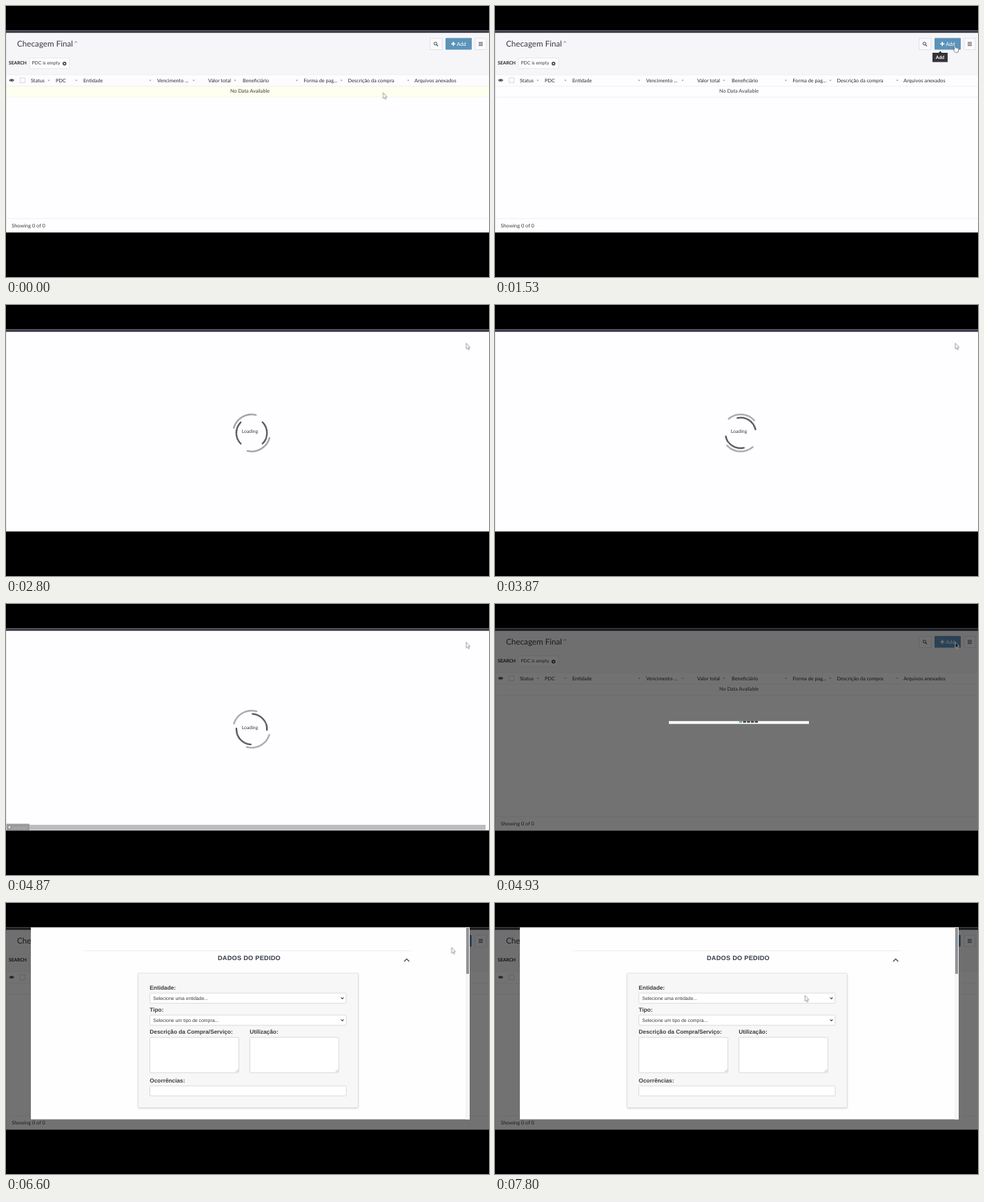
Animation of 700x394 px, one loop 8 s. Source, as an HTML page:

```html
<!DOCTYPE html>
<html lang="pt-BR">
<head>
<meta charset="utf-8">
<title>Checagem Final</title>
<style>
html, body { margin: 0; height: 100%; overflow: hidden; background: #000; }
svg { display: block; width: 100vw; height: 100vh; }
text { font-family: Lato, sans-serif; fill: #3c3c40; text-rendering: geometricPrecision; white-space: pre; }
.form text { font-family: "Liberation Sans", Arial, sans-serif; }
.label { font-size: 8.3px; font-weight: 700; }
.option { font-size: 6.9px; }
.line { fill: none; stroke: #45454a; }
.field { fill: #fff; stroke: #d2d2d5; stroke-width: .8; }

/* Hard switches: one 8 s clock for every part */
.list, .loading, .overlay, .hover, .tooltip, .hand, .arrow, .scroll, .dots, .form, .modal {
  animation: 8s step-end infinite;
}
.list { animation-name: list; }
.loading { animation-name: loading; }
.overlay { animation-name: overlay; }
.hover { animation-name: hover; }
.tooltip { animation-name: tooltip; }
.hand { animation-name: hand; }
.arrow { animation-name: arrow; }
.scroll { animation-name: scroll; }
.dots { animation-name: dots; }
.form { animation-name: form; }
@keyframes list { 0%, 61.625% { opacity: 1 } 25.875% { opacity: 0 } }
@keyframes loading { 0%, 61.625% { opacity: 0 } 25.875% { opacity: 1 } }
@keyframes overlay { 0% { opacity: 0 } 61.625% { opacity: 1 } }
@keyframes hover { 0% { opacity: 1 } 13.375% { opacity: 0 } }
@keyframes tooltip { 0%, 25.875% { opacity: 0 } 17.5% { opacity: 1 } }
@keyframes hand { 0%, 25.875% { opacity: 0 } 17% { opacity: 1 } }
@keyframes arrow {
  0%, 25.875% { opacity: 1; fill: #fff; stroke: #77777c }
  17% { opacity: 0 }
  61.625% { opacity: 1; fill: #111; stroke: #ccc }
  64.2% { opacity: 1; fill: #fff; stroke: #77777c }
}
@keyframes scroll { 0%, 61.625% { opacity: 0 } 54.125% { opacity: 1 } }
@keyframes dots { 0%, 65% { opacity: 0 } 61.625% { opacity: 1 } }
@keyframes form { 0% { opacity: 0 } 72.5% { opacity: 1 } }

/* Movement */
.modal { animation: modal 8s linear infinite; fill: #fefefe; }
@keyframes modal {
  0%, 61.624% { x: 252px; y: 170.5px; width: 0; height: 0 }
  61.625% { x: 252px; y: 170.5px; width: 203px; height: 3.6px }
  64.125%, 65% { x: 252px; y: 122px; width: 203px; height: 102px; animation-timing-function: ease-out }
  68.375%, 100% { x: 36px; y: 35.5px; width: 636px; height: 279px }
}
.cursor { animation: cursor 8s linear infinite; }
@keyframes cursor {
  0%, 12.5% { transform: translate(546.5px, 126px); animation-timing-function: ease-in-out }
  18.4%, 80% { transform: translate(667px, 55.5px); animation-timing-function: ease-in-out }
  90% { transform: translate(504px, 125px); animation-timing-function: ease-out }
  94.125%, 100% { transform: translate(449.3px, 134.5px) }
}
.spinner { animation: shift 8s step-end infinite; }
@keyframes shift { 0% { transform: translate(356px, 186px) } 54.125% { transform: translate(356px, 182px) } }
.ring { fill: none; stroke-width: 2.2; stroke-linecap: round; }
.outer { stroke: #85858a; stroke-dasharray: 88 92; animation: outer 8s linear infinite; }
.inner { stroke: #4a4a4e; stroke-dasharray: 90 90; animation: inner 8s linear infinite; }
@keyframes outer {
  0%, 25.875% { transform: rotate(-131deg) }
  50.875% { transform: rotate(269deg); stroke: #a2a2a6 }
  54.125% { transform: rotate(269deg); stroke: #a2a2a6 }
  61.625%, 100% { transform: rotate(389deg); stroke: #a2a2a6 }
}
@keyframes inner {
  0%, 25.875% { transform: rotate(117deg) }
  50.875%, 54.125% { transform: rotate(-327deg) }
  61.625%, 100% { transform: rotate(-460deg) }
}
</style>
</head>
<body>
<svg viewBox="0 0 700 394" preserveAspectRatio="none">
  <defs>
    <path id="caret" d="M-1.6 -.8h3.2l-1.6 1.7z" fill="#909094"/>
    <path id="chevron" class="line" d="M-1.9 -1l1.9 2 1.9-2" stroke-width="1.2"/>
    <path id="grip" class="line" d="M-4 0l4-4M-2 0l2-2" stroke-width=".6" style="stroke:#999"/>
    <filter id="shadow"><feDropShadow dx="0" dy="1" stdDeviation="1.2" flood-opacity=".16"/></filter>
  </defs>

  <rect width="700" height="394"/>
  <rect y="35.5" width="700" height="293.8" fill="#fefdff"/>

  <g class="list">
    <rect y="39" width="700" height="61" fill="#f6f5f8"/>
    <text x="16" y="59.3" font-size="11.7">Checagem Final</text>
    <path class="line" d="M99.6 53.2l1.7-1.7 1.7 1.7" stroke-width=".8"/>

    <rect x="614.5" y="47" width="17.5" height="16.5" fill="#faf9fb" stroke="#dcdbe0" stroke-width=".8"/>
    <circle class="line" cx="622.4" cy="54.7" r="2.1"/>
    <path class="line" d="M624 56.3l2 2" stroke-width="1.2"/>
    <rect x="637" y="46.5" width="38" height="17" rx="1" fill="#5c93ba"/>
    <path d="M645.3 55h6M648.3 52v6" stroke="#fff" stroke-width="1.6"/>
    <text x="653.3" y="57.6" font-size="7.6" style="fill:#fff">Add</text>
    <rect x="680" y="47" width="16" height="16.5" fill="#faf9fb" stroke="#dcdbe0" stroke-width=".8"/>
    <path class="line" d="M685 53h6M685 55.2h6M685 57.4h6" stroke-width="1"/>

    <text x="4" y="85.4" font-size="6.7" font-weight="700" style="fill:#222">SEARCH</text>
    <rect x="34" y="75.5" width="58" height="15.5" fill="#fdfcfe" stroke="#e4e3e8" stroke-width=".8"/>
    <text x="37.5" y="85.4" font-size="6.85">PDC is empty</text>
    <circle class="line" cx="84.8" cy="83.7" r="1.9" stroke-width="1.7"/>

    <rect y="100" width="700" height="16.5" fill="#fdfcfe"/>
    <path d="M0 100h700M0 116.5h700M0 132.5h700M0 309h700" stroke="#ededf1" stroke-width=".8"/>
    <rect class="hover" y="117" width="700" height="15.3" fill="#feffee"/>
    <path d="M4.4 108q3.8-4.6 7.6 0q-3.8 4.2-7.6 0z" fill="#3c3c40"/>
    <circle cx="8.2" cy="107.8" r="1.5" fill="#222" stroke="#fff" stroke-width=".5"/>
    <rect x="20.5" y="104.7" width="7" height="7" fill="#fff" stroke="#c9c9ce" stroke-width=".7"/>
    <text y="110.5" font-size="7.3" font-weight="500"><tspan x="36">Status</tspan><tspan x="72">PDC</tspan><tspan x="112">Entidade</tspan><tspan x="219">Vencimento ...</tspan><tspan x="293">Valor total</tspan><tspan x="343">Beneficiário</tspan><tspan x="431.5">Forma de pag...</tspan><tspan x="495.5">Descrição da compra</tspan><tspan x="592">Arquivos anexados</tspan></text>
    <use href="#caret" x="62" y="108.3"/><use href="#caret" x="102" y="108.3"/>
    <use href="#caret" x="209" y="108.3"/><use href="#caret" x="272" y="108.3"/>
    <use href="#caret" x="332" y="108.3"/><use href="#caret" x="421.5" y="108.3"/>
    <use href="#caret" x="486" y="108.3"/><use href="#caret" x="583" y="108.3"/>
    <text x="353.5" y="126.2" font-size="7.3" text-anchor="middle">No Data Available</text>
    <text x="8.3" y="322" font-size="7.4">Showing 0 of 0</text>
  </g>

  <g class="tooltip">
    <path d="M634 68h9l2.3-2.5 2.3 2.5h8.4v13.5h-22z" fill="#333338"/>
    <text x="645" y="77" font-size="6.8" font-weight="700" text-anchor="middle" style="fill:#fff">Add</text>
  </g>

  <g class="loading">
    <g class="spinner">
      <circle class="ring outer" r="26.9" pathLength="360"/>
      <circle class="ring inner" r="22.2" pathLength="360"/>
      <text x="-2.5" y="0" font-size="6.9" text-anchor="middle">Loading</text>
    </g>
    <g class="scroll">
      <rect y="321" width="695" height="7.6" fill="#bcbcbd"/>
      <rect y="319.5" width="34" height="9.6" fill="#9a9a9b"/>
      <path d="M6 322.5v4l-3-2z" fill="#eee"/>
      <text x="9" y="326.6" font-size="5.2" style="fill:#b9b9ba">javascript</text>
    </g>
  </g>

  <path d="M.4 39v290" stroke="#dddce2" stroke-width=".8"/>
  <rect y="35.5" width="700" height="3.6" fill="#3d404d"/>
  <rect class="overlay" y="35.5" width="700" height="293.8" fill-opacity=".55"/>

  <rect class="modal"/>
  <g class="dots">
    <path d="M359.5 171.4h22" stroke="#2e2e33" stroke-width="2.2" stroke-dasharray="4.4 1.3"/>
    <path d="M353.8 171.4h4.4" stroke="#5f9a86" stroke-width="2.2"/>
  </g>

  <g class="form">
    <path d="M113 69.5h475" stroke="#ebebee" stroke-width=".8"/>
    <text x="352.5" y="83.4" font-size="9.2" font-weight="700" letter-spacing=".25" text-anchor="middle" style="fill:#343a46">DADOS DO PEDIDO</text>
    <path class="line" d="M577 85l3.7-3.7 3.7 3.7" stroke-width="1.3"/>
    <rect x="191.5" y="102" width="319" height="195.5" rx="1.5" fill="#f7f7f8" stroke="#dedee1" stroke-width=".8" filter="url(#shadow)"/>

    <text class="label" x="208.3" y="126">Entidade:</text>
    <rect class="field" x="208.5" y="131" width="284.5" height="14.8" rx="1.5"/>
    <text class="option" x="213.3" y="140.7">Selecione uma entidade...</text>
    <use href="#chevron" x="487.5" y="138.4"/>

    <text class="label" x="208.3" y="158.2">Tipo:</text>
    <rect class="field" x="208.5" y="163" width="284.5" height="14.8" rx="1.5"/>
    <text class="option" x="213.3" y="172.7">Selecione um tipo de compra...</text>
    <use href="#chevron" x="487.5" y="170.4"/>

    <text class="label" x="208.3" y="190.3">Descrição da Compra/Serviço:</text>
    <text class="label" x="353.2" y="190.3">Utilização:</text>
    <rect class="field" x="208.5" y="195.3" width="129" height="51.5" rx="1.5"/>
    <rect class="field" x="353.3" y="195.3" width="129" height="51.5" rx="1.5"/>
    <use href="#grip" x="336.7" y="246"/><use href="#grip" x="481.5" y="246"/>

    <text class="label" x="208.3" y="261.2">Ocorrências:</text>
    <rect class="field" x="208.5" y="266" width="284.5" height="14.5" rx="1.5"/>

    <rect x="666" y="35.5" width="6" height="279" fill="#f5f5f6"/>
    <rect x="667" y="36" width="4" height="67" fill="#929295"/>
  </g>

  <g class="cursor">
    <path class="arrow" d="M0 0v8.4l1.9-1.7 1.3 2.9 1.3-.6-1.3-2.8h2.5z" stroke-width=".7"/>
    <path class="hand" d="M-1.2 2q1-1 1.7.1v3l3.6.9q1 .3.8 1.5l-.7 4.3h-4.4l-2.6-3.7q0-1 1.6-.2z" fill="#fff" stroke="#55555a" stroke-width=".7"/>
  </g>
</svg>
</body>
</html>
```
